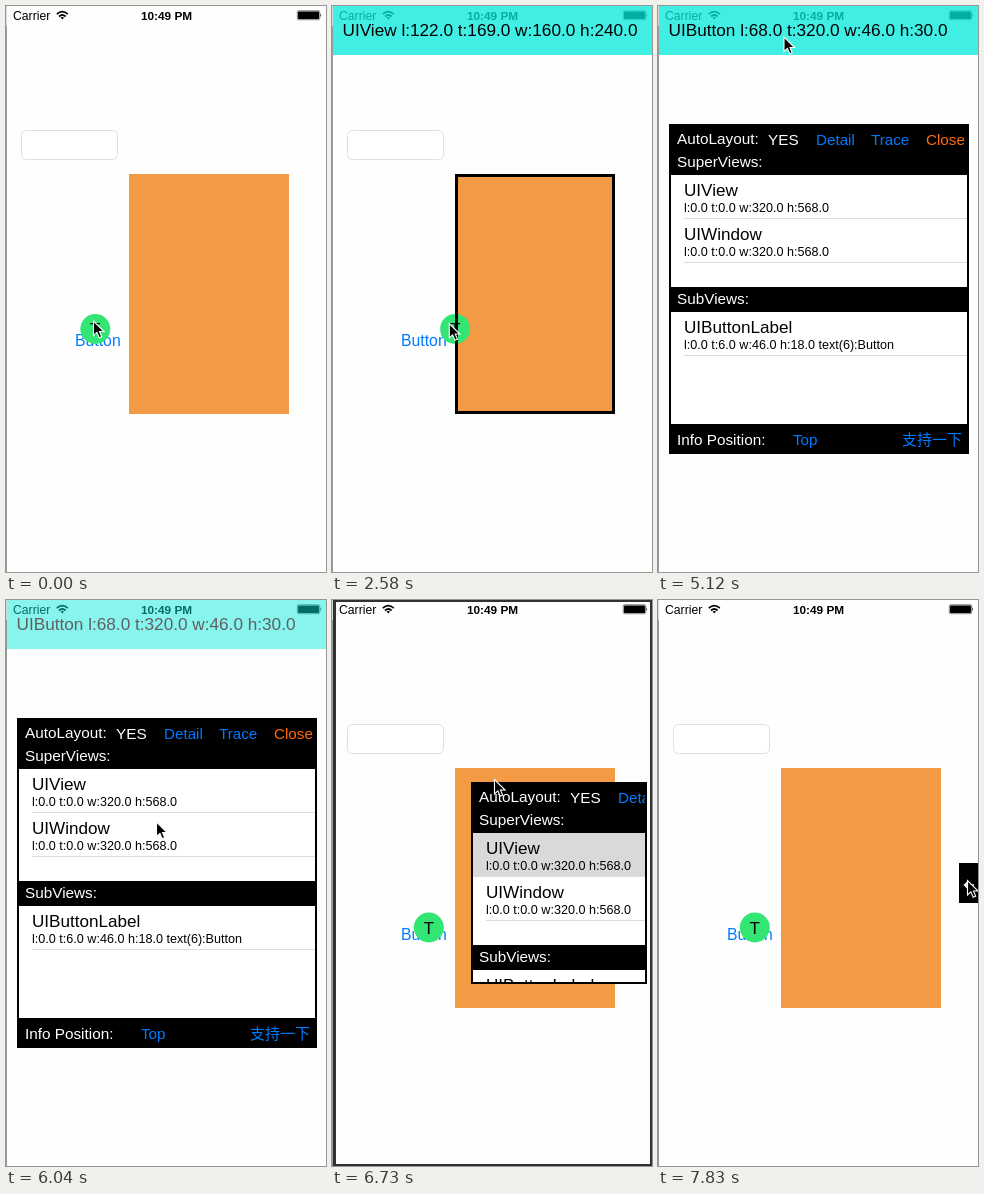
Animation of 320 by 566 pixels, one loop 8000 ms. Source, as an HTML page:

```html
<!DOCTYPE html>
<html lang="en">
<head>
<meta charset="utf-8">
<title>View inspector</title>
<style>
html, body { margin: 0; width: 100%; height: 100%; overflow: hidden; background: #fefefe; }
svg { display: block; }
text { font-family: "Liberation Sans", Arial, sans-serif; white-space: pre; }
.label { font-size: 15.3px; fill: #fff; }
.link { font-size: 15.2px; fill: #007aff; }
.close { fill: #ff6a0a; }
.title { font-size: 17.1px; }
.info { font-size: 12.6px; }
.cjk { font-family: "Noto Sans CJK SC", "Noto Sans CJK", sans-serif; font-size: 15px; }
</style>
</head>
<body>
<svg width="320" height="566">
  <rect width="320" height="566" fill="#fefefe"/>
  <rect width="1" height="20" fill="#d8d8d8"/>
  <rect y="20" width="1" height="546" fill="#999"/>

  <text x="7" y="14" font-size="12.2">Carrier</text>
  <g fill="none" stroke="#000" stroke-width="1.7">
    <path d="M50.8 8.2Q56.3 3.2 61.8 8.2M53 10.5Q56.3 7.5 59.6 10.5"/>
    <path d="M54.5 11.6Q56.3 10.2 58.1 11.6L56.3 13.6Z" fill="#000" stroke="none"/>
  </g>
  <text x="135" y="14" font-size="11.8" font-weight="bold">10:49 PM</text>
  <rect x="291.25" y="4.75" width="22.5" height="9" rx="1.5" fill="none" stroke="#000" stroke-width=".5"/>
  <rect x="292" y="5.5" width="21" height="7.5" rx=".8"/>
  <path d="M314.4 7.6Q316 9.3 314.4 11Z"/>

  <rect x="15.5" y="124.5" width="96" height="29" rx="5" fill="#fff" stroke="#e0e0e0"/>
  <text x="69" y="340" font-size="15.8" fill="#007aff">Button</text>
  <rect x="123" y="168" width="160" height="240" fill="#f39a44"/>

  <g id="ball">
    <circle r="15" fill="#33e573"/>
    <text y="6" font-size="17" text-anchor="middle">T</text>
  </g>
  <rect id="frame" fill="none" stroke="#000" stroke-width="3"/>

  <g id="banner">
    <rect x="1" width="319" height="49" fill="#01e8db" fill-opacity=".75"/>
    <text id="caption" x="10.5" y="30" font-size="17.2"></text>
  </g>

  <svg id="panel" overflow="hidden">
    <rect width="100%" height="100%"/>
    <g id="content">
      <text class="label" x="8" y="20">AutoLayout:</text>
      <text class="label" x="99" y="21">YES</text>
      <text class="link" x="147" y="21">Detail</text>
      <text class="link" x="202" y="21">Trace</text>
      <text class="link close" x="257" y="21">Close</text>
      <text class="label" x="8" y="43">SuperViews:</text>
      <rect x="2" y="51" width="296" height="112" fill="#fff"/>
      <rect id="pressed" x="2" y="51" width="296" height="44" fill="#d9d9d9"/>
      <text class="label" x="8" y="180">SubViews:</text>
      <rect x="2" y="188" width="296" height="112" fill="#fff"/>
      <g id="rows"></g>
      <text class="label" x="8" y="321">Info Position:</text>
      <text class="link" x="124" y="321">Top</text>
      <text class="link cjk" x="233" y="321">支持一下</text>
    </g>
    <rect width="100%" height="100%" fill="none" stroke="#000" stroke-width="4"/>
    <path id="arrow" d="M15 22H5.5M9 18.5L5.5 22L9 25.5" fill="none" stroke="#fff" stroke-width="1.4"/>
  </svg>

  <path id="cursor" d="M0 0V14.5L3.4 11.4L5.7 16.8L8.2 15.7L6 10.5H10.6Z" stroke="#fff" stroke-width="1.1"/>
</svg>

<script>
const LOOP = 8000;
const GRAB = 840, RELEASE = 4290, OPEN = 4880, FADE = 5860, PRESS = 6500, SHRINK = 6630, STOP = 7830;
const LAG = 30; // the ball trails the pointer

const $ = id => document.getElementById(id);
const attrs = (el, values) => { for (const k in values) el.setAttribute(k, values[k]); };
const show = (el, on) => { el.style.display = on ? "" : "none"; };
const moveTo = (el, x, y) => el.setAttribute("transform", `translate(${x} ${y})`);
const mix = (a, b, p) => a + (b - a) * p;

// Eased progress of a step that starts at `start` and lasts `length` ms.
function progress(t, start, length) {
  const p = Math.min(1, Math.max(0, (t - start) / length));
  return (1 - Math.cos(Math.PI * p)) / 2;
}

// Pointer strokes: start, end, destination
const home = [87.5, 315];
const strokes = [
  [GRAB, 1180, 93, 282], [1360, 1660, 100, 257], [1660, 2120, 148, 246],
  [2170, 2400, 151, 296], [2400, 2600, 116.5, 318], [2600, 2920, 115.5, 320], [2980, 3150, 95, 319.5],
  [RELEASE, 4700, 126, 31], [5120, 5400, 150.5, 220.5], [5570, 5630, 150.5, 222],
  [6040, PRESS, 162.5, 179.5], [7050, 7500, 309.5, 280.5]
];

function pointer(t) {
  let [x, y] = home;
  for (const [start, end, toX, toY] of strokes) {
    const p = progress(t, start, end - start);
    x = mix(x, toX, p);
    y = mix(y, toY, p);
  }
  return [x, y];
}

// Views from front to back, in stage pixels; the phone's origin is at (1, -1).
const views = [
  { name: "UIView", x: 123, y: 168, w: 160, h: 240 },
  { name: "UIButton", x: 69, y: 319, w: 46, h: 30 },
  { name: "UIView", x: 1, y: -1, w: 320, h: 568 }
];
const screen = views[2];
const contains = (v, x, y) => x >= v.x && x <= v.x + v.w && y >= v.y && y <= v.y + v.h;
const bounds = (l, t, w, h) => `l:${l.toFixed(1)} t:${t.toFixed(1)} w:${w.toFixed(1)} h:${h.toFixed(1)}`;
const describe = v => bounds(v.x - 1, v.y + 1, v.w, v.h);

const row = (y, title, info) => `
  <text class="title" x="15" y="${y + 21}">${title}</text>
  <text class="info" x="15" y="${y + 37}">${info}</text>
  <rect x="15" y="${y + 43}" width="283" height="1" fill="#dcdcdc"/>`;
$("rows").innerHTML =
  row(51, "UIView", describe(screen)) +
  row(95, "UIWindow", describe(screen)) +
  row(188, "UIButtonLabel", bounds(0, 6, 46, 18) + " text(6):Button");

function outline(view, opacity) {
  attrs($("frame"), { x: view.x + 1.5, y: view.y + 1.5, width: view.w - 3, height: view.h - 3, opacity });
}

function draw(t) {
  const [px, py] = pointer(t);
  moveTo($("cursor"), px, py);

  const [dragX, dragY] = pointer(Math.min(t - LAG, RELEASE));
  const x = dragX + 1.8, y = dragY + 8;
  moveTo($("ball"), x, y);

  const hit = views.find(v => contains(v, x, y));
  $("caption").textContent = `${hit.name} ${describe(hit)}`;
  $("banner").setAttribute("opacity", t < GRAB ? 0 : 1 - progress(t, FADE, 430));

  const dragging = t >= GRAB && t < RELEASE;
  const blinking = t >= SHRINK && t < STOP;
  const blink = 0.5 + 0.5 * Math.cos(Math.PI * (t - SHRINK - 10) / 310);
  outline(dragging ? hit : screen, dragging ? 1 : blinking ? blink : 0);

  const p = progress(t, SHRINK, 218);
  const between = (a, b) => Math.round(mix(a, b, p));
  attrs($("panel"), {
    x: between(11, 301), y: between(118, 263), width: between(300, 20), height: between(330, 40)
  });
  show($("panel"), t >= OPEN);
  show($("content"), p < 1);
  show($("arrow"), p === 1);
  show($("pressed"), t >= PRESS);
}

function tick() {
  draw(performance.now() % LOOP);
  requestAnimationFrame(tick);
}
tick();
</script>
</body>
</html>
```
